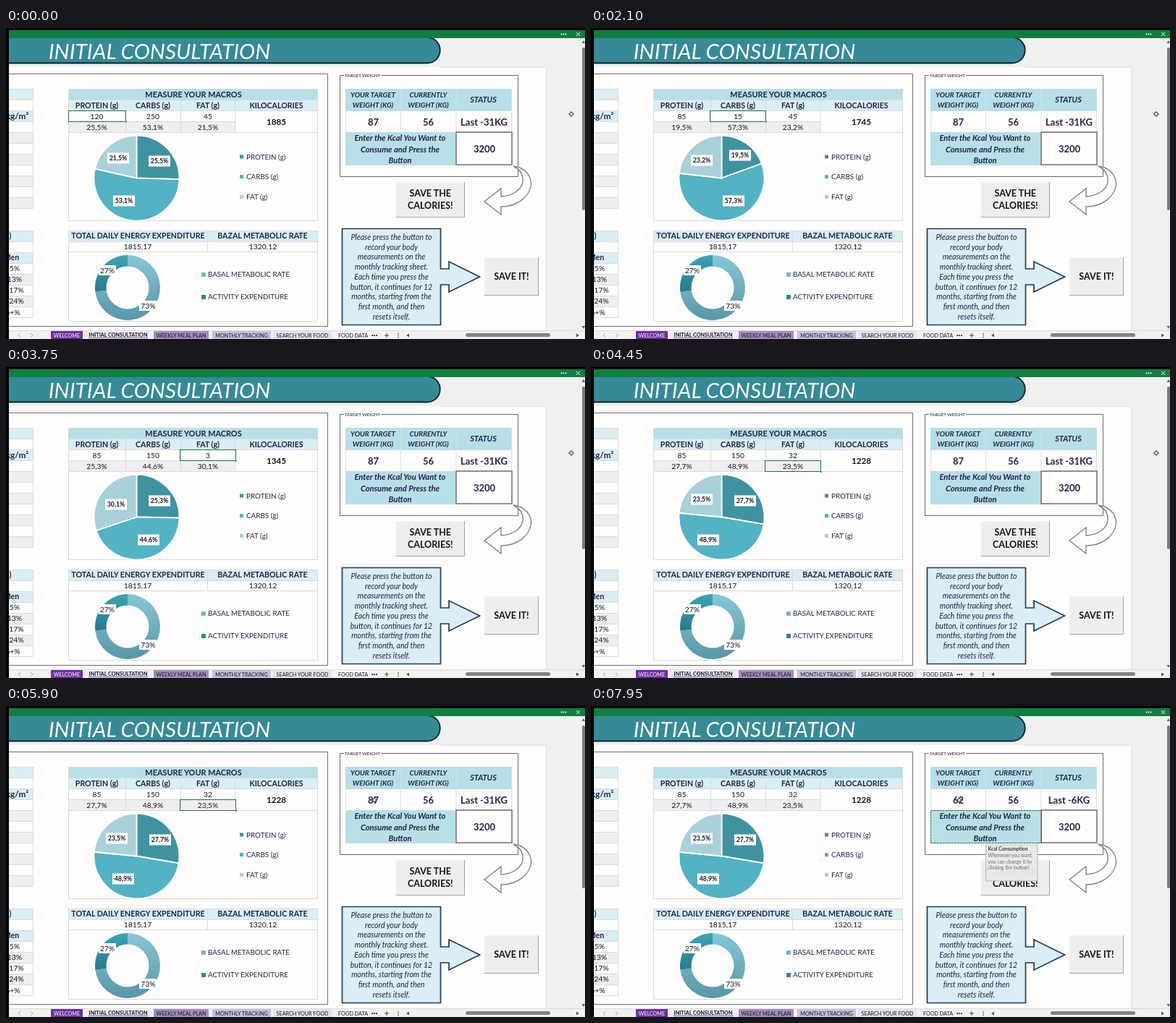
An HTML page that plays this animation: 800 px wide and 430 px high, repeating every 8 s.

```html
<!DOCTYPE html>
<html lang="en">
<head>
<meta charset="utf-8">
<title>Initial consultation</title>
<style>
html, body { margin: 0; width: 100%; height: 100%; overflow: hidden; background: #f1f0f0; }
svg { display: block; width: 100vw; height: 100vh; }
text { font-family: Lato, Carlito, sans-serif; fill: #15151f; text-anchor: middle; white-space: pre; }
.b { font-weight: 700; }
.i { font-style: italic; }
.navy { fill: #22234a; }
.left { text-anchor: start; }
.white { fill: #fff; }
</style>
</head>
<body>
<svg id="stage" viewBox="0 0 800 430"></svg>
<script>
const LOOP = 8000;
const PALE = '#daeef3', SKY = '#b7dfe6', GRID = '#d3dde0', GREEN = '#217346';
const PIE = ['#3f93a1', '#53b2c4', '#a9d1d9'];

const rect = (x1, y1, x2, y2, fill, extra = '') =>
  `<rect x="${x1}" y="${y1}" width="${x2 - x1}" height="${y2 - y1}" fill="${fill}" ${extra}/>`;
const path = (d, fill, stroke = 'none', width = 1, extra = '') =>
  `<path d="${d}" fill="${fill}" stroke="${stroke}" stroke-width="${width}" ${extra}/>`;
const line = (d, stroke, width = 1) => path(d, 'none', stroke, width);
// y is the middle of the capitals
const text = (str, x, y, size, cls = '', id = '') =>
  `<text ${id && `id="${id}"`} class="${cls}" x="${x}" y="${y + size * 0.36}" font-size="${size}">${str}</text>`;

const polar = (cx, cy, r, turn) => {
  const a = turn * 2 * Math.PI;
  return `${(cx + r * Math.sin(a)).toFixed(2)} ${(cy - r * Math.cos(a)).toFixed(2)}`;
};
const sector = (cx, cy, r, from, to) =>
  `M${cx} ${cy}L${polar(cx, cy, r, from)}A${r} ${r} 0 ${+(to - from > 0.5)} 1 ${polar(cx, cy, r, to)}Z`;

function windowFrame() {
  const tabs = [
    ['WELCOME', 62, 106, '#7030a0', 'white'],
    ['INITIAL CONSULTATION', 110, 200, '#f0ebf5', 'b'],
    ['WEEKLY MEAL PLAN', 204, 280, '#a48cbc', ''],
    ['MONTHLY TRACKING', 285, 366, '#c9bddc', ''],
    ['SEARCH YOUR FOOD', 369, 450, '#e6e1ee', ''],
    ['FOOD DATA', 455, 504, '#f5f3f8', '']
  ];
  return rect(794, 14, 800, 418, '#f0f0f0') +
    rect(796, 27, 800, 252, '#7c7c7c', 'rx="2"') +
    path('M795.5 21L798 17L800 21Z M795.5 412L798 416L800 412Z', '#666') +
    rect(4, 418, 800, 430, '#f1f1f2') + line('M4 418.5H800', '#dcdcdc') +
    rect(635, 422, 752, 427, '#828282', 'rx="2.5"') +
    path('M557 422.5L553 425L557 427.5Z M788 422.5L792 425L788 427.5Z', '#555') +
    line('M20 422L17 425L20 428M34 422L37 425L34 428', '#aaa') +
    tabs.map(([name, a, b, fill, cls]) =>
      rect(a, 419, b, 430, fill) + text(name, (a + b) / 2, cls === 'b' ? 424 : 425, 7.2, cls)).join('') +
    line('M114 428.5H196', '#7b5a9c') +
    text('•••', 509, 425, 5) + line('M523 425H529M526 422V428', '#444') +
    [422.5, 425, 427.5].map(y => `<circle cx="542" cy="${y}" r=".8" fill="#444"/>`).join('') +
    rect(0, 0, 800, 3, '#000') + rect(0, 0, 4, 430, '#000') + rect(4, 3, 800, 14, '#0f7f41') +
    [767.5, 770.5, 773.5].map(x => `<circle cx="${x}" cy="8.5" r="1" fill="#fff"/>`).join('') +
    line('M788 6L793 11M793 6L788 11', '#fff');
}

function banner() {
  return path('M-10 13H582A17.75 17.75 0 0 1 582 48.5H-10Z', '#368a97', '#0d2228', 1.8) +
    text('INITIAL CONSULTATION', 212, 32, 29.7, 'i white');
}

function leftTables() {
  let out = rect(-5, 84, 38, 99, PALE) + rect(-5, 114, 38, 129, PALE);
  for (const y of [144, 174, 204, 234]) out += rect(-5, y, 38, y + 15, '#efeef0');
  for (let y = 84; y <= 250; y += 15) out += line(`M4 ${y}.5H38`, GRID);
  out += line('M37.5 84V249', GRID) + text('kg/m²', 15.5, 122, 11.8, 'b navy');
  out += rect(-5, 280, 38, 295, PALE) + rect(-5, 310, 38, 325, PALE) +
    rect(-5, 340, 38, 355, '#efeef0') + rect(-5, 370, 38, 385, '#efeef0');
  for (let y = 280; y <= 400; y += 15) out += line(`M4 ${y}.5H38`, GRID);
  out += line('M37.5 280V400', GRID) + text(')', 6, 287, 10.5, 'b navy') + text('Men', 7.5, 317.5, 10.5, 'b navy');
  ['5%', '13%', '17%', '24%', '6+%'].forEach((s, k) =>
    out += text(s, [12, 12, 14.5, 14.5, 9.5][k], 332 + 15.2 * k, 10.4));
  return out;
}

function macros() {
  return rect(86, 84, 431, 99, SKY) + rect(86, 99, 431, 114, PALE) + rect(86, 129, 317, 144, '#efeef0') +
    line('M86 84.5H431M86 99.5H431M86 114.5H431M86 129.5H317M86 144.5H431M86.5 84V266.5H430.5V84' +
      'M165.5 99V144M241.5 99V144M317 99V144', GRID) +
    text('MEASURE YOUR MACROS', 259, 92, 10.9, 'b navy') +
    ['PROTEIN (g)', 'CARBS (g)', 'FAT (g)'].map((s, k) =>
      text(s, [125.5, 203, 279][k], 107, 10.6, 'b navy') +
      text('', [125.5, 203, 279][k], 122, 10.3, '', 'gram' + k) +
      text('', [125.5, 203, 279][k], 137, 10.3, '', 'share' + k) +
      rect(323, 175.5 + 27.7 * k, 328, 180.5 + 27.7 * k, PIE[k]) +
      text(s, 332, 178 + 27.7 * k, 9.9, 'left navy') +
      `<path id="slice${k}" fill="${PIE[k]}" stroke="#fff" stroke-width="1.8" stroke-linejoin="round"/>`).join('') +
    text('KILOCALORIES', 373.5, 107, 10.6, 'b navy') +
    text('', 373.5, 129.5, 11.7, 'b', 'kcal') +
    ['old0', 'new0', 'new1', 'new2', 'old1', 'old2'].map(id =>
      `<g id="${id}">${rect(-15, -7.5, 15, 7.5, '#fff')}${text('', 0, 0, 8.8, 'b')}</g>`).join('');
}

function energy() {
  const ring = (from, to, fill) => path(sector(168, 359, 45, from, to), fill);
  return rect(86, 280, 431, 295, PALE) +
    line('M86 280.5H431M86 295.5H431M86 309.5H431M86.5 280V405.5H430.5V280M278.5 280V309', GRID) +
    text('TOTAL DAILY ENERGY EXPENDITURE', 182.5, 287.5, 10.7, 'b navy') +
    text('BAZAL METABOLIC RATE', 354.5, 287.5, 10.6, 'b navy') +
    text('1815,17', 182, 302.5, 10.4) + text('1320,12', 355, 302.5, 10.4) +
    ring(0, 0.73, 'url(#basal)') + ring(0.73, 1, 'url(#active)') +
    '<circle cx="168" cy="359" r="29.5" fill="#fefdfc"/>' +
    rect(128, 328, 152, 342, '#fff') + text('27%', 140, 335, 10.4) +
    rect(184, 377, 208, 391, '#fff') + text('73%', 196.5, 384, 10.4) +
    rect(270, 338, 276, 344, '#79b7c7') + text('BASAL METABOLIC RATE', 279, 340.5, 9.8, 'left navy') +
    rect(270, 369, 276, 375, '#2f8696') + text('ACTIVITY EXPENDITURE', 279, 371.5, 9.8, 'left navy');
}

function targetTable() {
  const head = (s, x, y) => text(s, x, y, 9.8, 'b i navy');
  return line('M467 65.5H461.5V205.5H707.5V65.5H518', '#6a6a6a') + text('TARGET WEIGHT', 492.5, 66, 6.2) +
    rect(469, 84, 699, 115, SKY) + rect(469, 144, 622, 190, SKY) +
    line('M469.5 115V144M545.5 84V144M622 84V144M698.5 84V144', '#cfe3e7') +
    head('YOUR TARGET', 507, 92) + head('WEIGHT (KG)', 507, 106) +
    head('CURRENTLY', 583.5, 92) + head('WEIGHT (KG)', 583.5, 106) +
    text('STATUS', 659.5, 99, 10.9, 'b i navy') +
    text('', 507.5, 130, 13, 'b navy', 'target') + text('56', 583.5, 130, 13, 'b navy') +
    text('', 660.5, 130, 13, 'b navy', 'status') +
    ['Enter the Kcal You Want to', 'Consume and Press the', 'Button'].map((s, k) =>
      text(s, 544.5, 152 + 15.7 * k, 11.2, 'b i navy')).join('') +
    rect(622, 144, 699, 189, '#fefdfc', 'stroke="#858585" stroke-width="1.8"') +
    text('3200', 661, 167.5, 13, 'b navy');
}

function button(x1, y1, x2, y2, lines) {
  const cx = (x1 + x2) / 2, cy = (y1 + y2) / 2;
  return rect(x1, y1, x2, y2, '#edefed') +
    line(`M${x1} ${y2}V${y1}H${x2}`, '#fafafa') +
    line(`M${x1} ${y2 - 0.5}H${x2 - 0.5}V${y1}`, '#a5a5a5') +
    lines.map((s, k) => text(s, cx, cy + (k - (lines.length - 1) / 2) * 17.5 - 0.3, 12.5, 'b')).join('');
}

function actions() {
  const note = ['Please press the button to', 'record your body', 'measurements on the',
    'monthly tracking sheet.', 'Each time you press the', 'button, it continues for 12',
    'months, starting from the', 'first month, and then', 'resets itself.'];
  return path('M701 191C718 193 726 205 725.5 217C723 234 706 247 684 247V258L661 240L684 222V233' +
      'C700 232 712 224 714 213C715 204 711 196 701 191Z', '#fefdfc', '#858585', 1.4) +
    button(538.5, 213, 634, 262, ['SAVE THE', 'CALORIES!']) +
    path('M464.5 277.5H600.5V333H612V323L654.5 344L612 365V355H600.5V410.5H464.5Z', PALE, '#1d3c58', 1.7) +
    note.map((s, k) => text(s, 532.5, 289 + 13.75 * k, 10.5, 'i navy')).join('') +
    button(661, 317, 736, 370, ['SAVE IT!']);
}

function overlays() {
  const tip = ['Kcal Consumption', 'Whenever you want,', 'you can change it by', 'clicking the button!'];
  return `<rect id="cell" fill="none" stroke="${GREEN}"/>` +
    `<rect id="handle" width="3" height="3" fill="${GREEN}" stroke="#fff" stroke-width=".6"/>` +
    '<g id="tip">' + rect(545.5, 192, 617, 242, '#e9e9e7', 'stroke="#b5b5b5"') +
    tip.map((s, k) => text(s, 548.5, 198 + 8.6 * k, 6.8, k ? 'left' : 'b left')
      .replace('<text', `<text opacity="${k ? 0.6 : 0.85}"`)).join('') + '</g>' +
    '<g id="cursor">' + path('M-1-3H1V-1H3V1H1V3H-1V1H-3V-1H-1Z', '#fff', '#333', 0.9) + '</g>';
}

const shade = (id, a, b) =>
  `<linearGradient id="${id}" x1="0" y1="0" x2="0" y2="1"><stop stop-color="${a}"/><stop offset="1" stop-color="${b}"/></linearGradient>`;

document.getElementById('stage').innerHTML =
  `<defs>${shade('basal', '#86c6d6', '#5797a7')}${shade('active', '#3ba5b6', '#277b8b')}</defs>` +
  rect(0, 0, 800, 430, '#f1f0f0') + rect(4, 54, 747, 418, '#fefdfc') + line('M600 54.5H746.5V418', '#e2e1e1') +
  banner() + line('M0 63.5H444.5V412.5H0', '#6f6f6f') +
  leftTables() + macros() + energy() + targetTable() + actions() + windowFrame() + overlays();

const cells = {
  protein: [86.5, 114.5, 165.5, 129.5], proteinShare: [86.5, 129.5, 165.5, 144.5],
  carbs: [164.5, 114.5, 241.5, 129.5], carbsShare: [164.5, 129.5, 241.5, 144.5],
  fat: [240.5, 114.5, 317.5, 129.5], fatShare: [240.5, 129.5, 317.5, 144.5],
  target: [469.5, 115.5, 545.5, 144.5], kcal: [469.5, 144.5, 622.5, 189.5]
};
const selection = [[0, 'protein'], [550, 'proteinShare'], [850, 'carbsShare'], [1500, 'carbs'],
  [2600, 'carbsShare'], [3450, 'fatShare'], [3600, 'fat'], [4000, 'fatShare'], [6100, 'target'], [7700, 'kcal']];
const typed = [
  [[0, 120], [200, 8], [350, 85]],
  [[0, 250], [1850, 1], [2000, 15], [2300, 150]],
  [[0, 45], [3700, 3], [3850, 32]]
];
const typedTarget = [[0, 87], [6900, 6], [7150, 62]];
// committed grams with the resting places of the pie labels
const commits = [
  { time: -1000, grams: [120, 250, 45], labels: [[212, 184], [163, 239], [155, 180]] },
  { time: 550, grams: [85, 250, 45], labels: [[206, 176], [197, 239], [153, 183]] },
  { time: 2600, grams: [85, 150, 45], labels: [[212, 185], [197, 239], [152, 190]] },
  { time: 4000, grams: [85, 150, 32], labels: [[213, 185], [162, 239], [153, 183]] }
];
for (const c of commits) {
  const parts = c.grams.map((g, k) => g * [4, 4, 9][k]);
  c.kcal = parts.reduce((a, b) => a + b);
  c.shares = parts.map(p => p / c.kcal);
}

const $ = id => document.getElementById(id);
const valueAt = (list, t) => list.filter(([time]) => time <= t).pop()[1];
const ease = p => { p = Math.min(1, Math.max(0, p)); return p * p * (3 - 2 * p); };
const percent = v => (v * 100).toFixed(1).replace('.', ',') + '%';

function placeLabel(id, [x, y], share, visible) {
  const g = $(id);
  g.setAttribute('transform', `translate(${x} ${y})`);
  g.setAttribute('visibility', visible ? 'visible' : 'hidden');
  g.lastChild.textContent = percent(share);
}

function drawMacros(t) {
  const index = commits.filter(c => c.time <= t).length - 1;
  const now = commits[index], before = commits[Math.max(0, index - 1)];
  const age = t - now.time, p = ease(age / 300);
  let from = 0;
  now.shares.forEach((share, k) => {
    const to = from + before.shares[k] + (share - before.shares[k]) * p;
    $('slice' + k).setAttribute('d', sector(180.5, 207.5, 59, from, to));
    from = to;
    $('gram' + k).textContent = valueAt(typed[k], t);
    $('share' + k).textContent = percent(share);
    placeLabel('old' + k, before.labels[k], before.shares[k], age < 400);
    placeLabel('new' + k, now.labels[k], share, age >= 250);
  });
  $('kcal').textContent = now.kcal;
}

function drawSelection(t) {
  const name = valueAt(selection, t), [x1, y1, x2, y2] = cells[name], cell = $('cell');
  const box = { x: x1, y: y1, width: x2 - x1, height: y2 - y1,
    'stroke-dasharray': name === 'kcal' ? '3 1' : 'none' };
  for (const key in box) cell.setAttribute(key, box[key]);
  $('handle').setAttribute('transform', `translate(${x2 - 1.5} ${y2 - 1.5})`);
  $('handle').setAttribute('visibility', name === 'kcal' ? 'hidden' : 'visible');
}

function draw(t) {
  drawMacros(t);
  drawSelection(t);
  $('target').textContent = valueAt(typedTarget, t);
  $('status').textContent = t < 7700 ? 'Last -31KG' : 'Last -6KG';
  $('tip').setAttribute('opacity', 0.96 * ease((t - 7750) / 180));
  const m = ease((t - 4950) / 750);
  $('cursor').setAttribute('transform', `translate(${781 - 272 * m} ${119 + 11 * m})`);
}

const start = performance.now();
function tick() {
  draw((performance.now() - start) % LOOP);
  requestAnimationFrame(tick);
}
tick();
</script>
</body>
</html>
```
